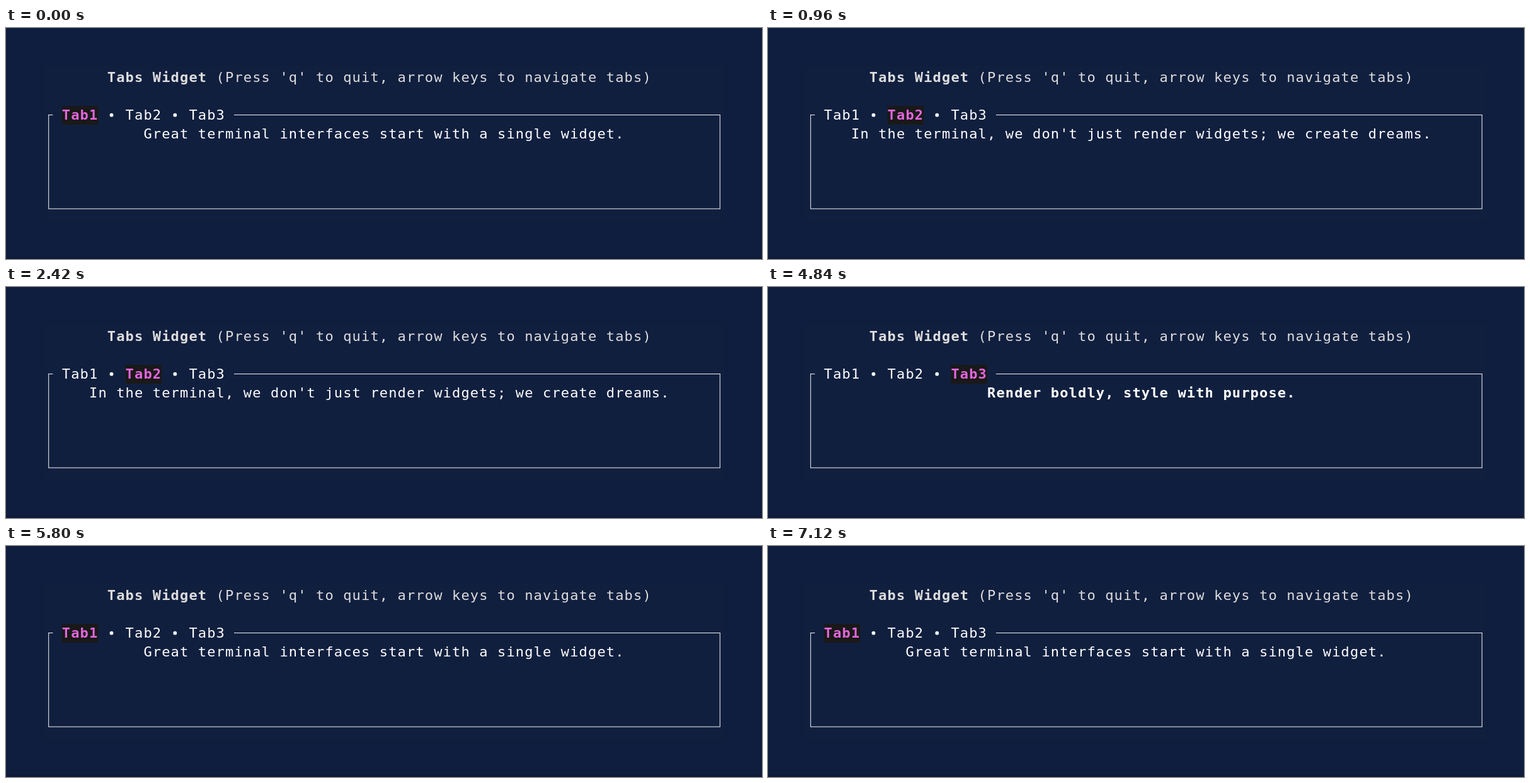
Animation, 1200 px wide and 368 px high, one loop 8 s. Source, as an HTML page with a canvas:

```html
<!DOCTYPE html>
<html lang="en">
<head>
<meta charset="utf-8">
<title>Tabs widget</title>
<style>
  html, body { margin: 0; width: 100%; height: 100%; overflow: hidden; background: #0f1e3e; }
  canvas { display: block; }
</style>
</head>
<body>
<canvas id="stage" width="1200" height="368"></canvas>
<script>
const ctx = document.getElementById('stage').getContext('2d');
const LOOP = 8000;
const CELL = 14.4, ROW = 30, LEFT = 60, TOP = 64;
const FONT = '22px "DejaVu Sans Mono", monospace';

const pages = [
  { text: 'Great terminal interfaces start with a single widget.', col: 11 },
  { text: "In the terminal, we don't just render widgets; we create dreams.", col: 5 },
  { text: 'Render boldly, style with purpose.', col: 20, bold: true },
];
const steps = [[0, 0], [960, 1], [3400, 2], [5800, 0]];

const colX = col => LEFT + col * CELL;
const rowY = row => TOP + row * ROW;

function rect(x, y, w, h, color) {
  ctx.fillStyle = color;
  ctx.fillRect(x, y, w, h);
}

// Places text on the terminal's character grid.
function write(text, col, row, color, bold) {
  ctx.font = (bold ? 'bold ' : '') + FONT;
  ctx.fillStyle = color;
  [...text].forEach((ch, i) => {
    if (ch !== ' ') ctx.fillText(ch, colX(col + i), rowY(row) + 22);
  });
}

function dot(col, row) {
  ctx.fillStyle = '#fff';
  ctx.beginPath();
  ctx.arc(colX(col + 0.5) - 0.5, rowY(row) + 14.7, 2.9, 0, Math.PI * 2);
  ctx.fill();
}

function drawBox() {
  const line = '#f4f5f7';
  rect(67, 138, 7.4, 1, line);
  rect(362, 138, 772, 1, line);
  rect(67.2, 138, 1, 150, line);
  rect(1132.8, 138, 1, 150, line);
  rect(67.2, 287.5, 1066.6, 1, line);
}

function drawTabs(active) {
  for (let i = 0; i < 3; i++) {
    const col = 2 + i * 7;
    const on = i === active;
    if (on) rect(colX(col), rowY(2), 4 * CELL, ROW, '#191919');
    write('Tab' + (i + 1), col, 2, on ? '#e466dd' : '#fff', on);
    if (i < 2) dot(col + 5, 2);
  }
}

function draw(time) {
  const active = steps.filter(([start]) => start <= time).pop()[1];
  const page = pages[active];
  rect(0, 0, 1200, 368, '#0f1e3e');
  rect(60, 60, 1080, 248, '#111f3f');
  rect(0, 365, 1200, 3, '#0d1a37');
  write('Tabs Widget', 7, 0, '#dddddd', true);
  write("(Press 'q' to quit, arrow keys to navigate tabs)", 19, 0, '#dddddd');
  drawBox();
  drawTabs(active);
  write(page.text, page.col, 3, '#fff', page.bold);
}

const begin = performance.now();
function tick() {
  draw((performance.now() - begin) % LOOP);
  requestAnimationFrame(tick);
}
tick();
</script>
</body>
</html>
```
